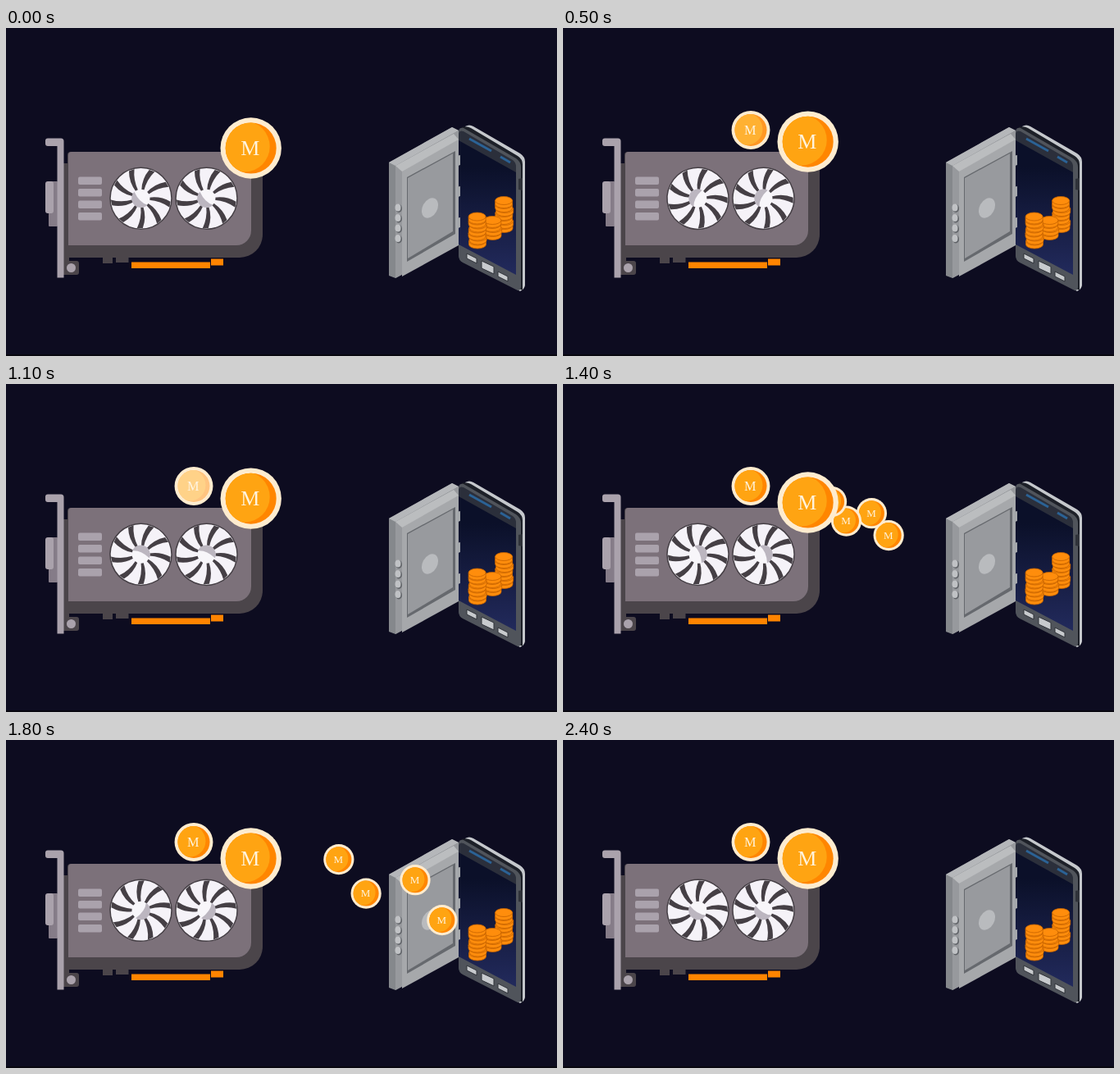
Write an HTML page that moves like this. It is 672x400 px and loops after 2500 ms.

```html
<!DOCTYPE html>
<html lang="en">
<head>
<meta charset="utf-8">
<title>Coin mining</title>
<style>
  html, body { margin: 0; width: 100%; height: 100%; overflow: hidden; background: #0d0c20; }
  svg { display: block; width: 672px; height: 400px; }
  text { font-family: "Liberation Serif", "Noto Serif", serif; }
  .dark { fill: #4b454a; }
  .light { fill: #aaa2ac; }
</style>
</head>
<body>
<svg viewBox="0 0 672 400">
  <defs>
    <clipPath id="disc"><circle r="31"/></clipPath>
    <linearGradient id="screen" x2="0" y2="1">
      <stop offset=".2" stop-color="#0b1029"/>
      <stop offset="1" stop-color="#222a5c"/>
    </linearGradient>
    <g id="coin">
      <circle r="37.2" fill="#feeccf"/>
      <circle r="31" fill="#ff8600"/>
      <g clip-path="url(#disc)"><circle cx="-8" cy="-2" r="31" fill="#ffa412"/></g>
      <text x="-1" y="8" font-size="26" text-anchor="middle" fill="#fff3dc">M</text>
    </g>
    <path id="gap" d="M10-1Q24-3 36 4L35 11Q24 3 10 2Z" fill="#453f45"/>
  </defs>

  <rect width="672" height="400" fill="#0d0c20"/>
  <rect y="398" width="672" height="2" fill="#08070f"/>

  <!-- graphics card -->
  <rect class="dark" x="69" y="165" width="8" height="120"/>
  <rect x="52" y="187" width="11" height="55" rx="1" fill="#857c88"/>
  <rect class="light" x="48" y="187" width="10" height="39" rx="3"/>
  <path class="dark" d="M69 284h17q3 0 3 3v11q0 3-3 3H69z"/>
  <circle class="light" cx="79.5" cy="292.5" r="5.5"/>
  <path class="light" d="M51 134.500H67q3.500 0 3.500 3.500V304.500H62.500V144H51q-3 0-3-3v-3.500q0-3 3-3z"/>
  <path class="dark" d="M75 155q0-4 4-4H309q4 0 4 4V252A28 28 0 0 1 285 280H75z"/>
  <path d="M76 155q0-4 4-4H299V247A18 18 0 0 1 281 265H76z" fill="#7c717a"/>
  <path class="dark" d="M118 279h12v8h-12zM134 279h15.500v7H134z"/>
  <path d="M153 285.500h96v7.500h-96zM250 281.500h15v8h-15z" fill="#ff8400"/>
  <g id="vents"></g>
  <g id="fans"></g>

  <!-- safe door -->
  <path d="M467 164L544 121L552 125V264L475 305L467 302Z" fill="#85888c"/>
  <path d="M467 164L544 121L552 125L475 168Z" fill="#b5b7ba"/>
  <path d="M475 168L552 125V264L475 305Z" fill="#97999d"/>
  <path d="M483 174L552 136V265L483 303Z" fill="#a6a8ab"/>
  <path d="M475 168L546 129L552 136L483 175Z" fill="#bbbdbf"/>
  <path d="M489 182L548 150V251L489 285Z" fill="#66696e"/>
  <path d="M490 183L545 153V248L490 281Z" fill="#989a9e"/>
  <ellipse cx="517" cy="219.500" rx="9" ry="13" fill="#b9bbbe" transform="rotate(28 517 219.500)"/>
  <g id="knobs"></g>

  <!-- phone -->
  <path d="M560 120Q565 117 570 120L627 153Q633 157 633 163V314Q632 319 627 321L560 284Z" fill="#c5c8cc"/>
  <path d="M556 121Q562 119 567 122L624 156Q630 160 630 166V320L556 282Z" fill="#1d2028"/>
  <path d="M552 127Q552 121 558 122L622 159Q628 163 628 170V315Q628 322 622 319L557 286Q552 283 552 278Z" fill="#50545b"/>
  <path d="M552 129Q553 124 558 126L618 161Q622 164 622 169V178L552 139Z" fill="#2b2f3b"/>
  <path d="M552 137L622 176V301L552 264Z" fill="url(#screen)"/>
  <path d="M565 135L592 150M603 157L615 164" stroke="#2b6295" stroke-width="3"/>
  <path d="M625 184l5-1v15l-5-1z" fill="#2f3239"/>
  <g fill="#c7cacd" stroke="#2f3239">
    <path d="M562 275l12 6v6l-12-6z"/>
    <path d="M580 284l15 7v9l-15-7z"/>
    <path d="M600 297l12 6v6l-12-6z"/>
  </g>
  <g id="hinges" fill="#a5a8ac"></g>
  <g id="stacks" fill="#ff8d0c" stroke="#c56300" stroke-width=".8"></g>

  <g id="flying"></g>
  <g id="small">
    <use href="#coin"/>
    <circle id="flash" r="32" fill="#fff7ea"/>
  </g>
  <use id="big" href="#coin"/>
</svg>
<script>
const $ = id => document.getElementById(id);
const repeat = (n, make) => Array.from({ length: n }, (_, i) => make(i)).join("");
const clamp = v => Math.min(1, Math.max(0, v));

$("vents").innerHTML = repeat(4, i =>
  `<rect class="light" x="88" y="${181.5 + i * 14.5}" width="29" height="9.5" rx="2"/>`);
$("knobs").innerHTML = repeat(4, i => {
  const y = 219 + i * 12.5;
  return `<ellipse cx="479" cy="${y + 1}" rx="4" ry="5" fill="#5f6267"/>
    <ellipse cx="478" cy="${y}" rx="3.5" ry="4.5" fill="#c0c2c5"/>`;
});
$("hinges").innerHTML = repeat(3, i => `<path d="M549 ${156 + i * 38}l5-1v12l-5 2z"/>`);

const stack = (x, base, n) => repeat(n, i => {
  const y = base - i * 5, cx = x + Math.sin(i * 2) * .7;
  return `<path d="M${cx - 10.5} ${y}v4a10.5 5 0 0 0 21 0v-4z"/>
    <ellipse cx="${cx}" cy="${y}" rx="10.5" ry="5"/>`;
});
$("stacks").innerHTML = stack(607.5, 240.5, 7) + stack(593.5, 249.5, 4) + stack(575, 260, 7);

const BLADES = 9;
const gaps = repeat(BLADES, i => `<use href="#gap" transform="rotate(${i * 360 / BLADES})"/>`);
$("fans").innerHTML = repeat(2, i =>
  `<g transform="translate(${164.5 + i * 80} 207.8)"><g class="rotor">
    <circle r="37.5" fill="#f5f2f8" stroke="#453f45" stroke-width="1.5"/>${gaps}
    <circle r="11" fill="#f8f6fa"/>
    <path d="M-8-8A11 11 0 0 0 8 8Q-2 5-8-8z" fill="#bcb6c0"/>
  </g></g>`);

const LOOP = 2500, STEP = 100;
const LAUNCH = 1200, FLIGHT = 1000;
const FROM = [298, 145], TO = [574, 210];

// Two bend points for the curve of each flying coin.
const bends = [
  [[480, 225], [580, 232]],
  [[438, 175], [532, 152]],
  [[383, 193], [430, 178]],
  [[350, 148], [375, 112]]
];
$("flying").innerHTML = repeat(bends.length, () => `<use href="#coin"/>`);
const coins = [...$("flying").children];
const rotors = document.querySelectorAll(".rotor");

function bezier([a, b], u) {
  const v = 1 - u;
  return FROM.map((p, k) =>
    v * v * v * p + 3 * u * v * v * a[k] + 3 * u * u * v * b[k] + u * u * u * TO[k]);
}

// Two hops, the second one lower, then rest.
function bigY(t) {
  const rest = 146.5 - 2 * clamp(t / LAUNCH);
  const height = t < 600 ? 14 : t < LAUNCH ? 10 : 0;
  return rest - height * Math.sin(Math.PI * (t % 600) / 600);
}

const flash = t => t < 1300 ? .55 + .4 * Math.cos(2 * Math.PI * (t - 900) / 800) : 0;

const place = (el, x, y, scale = 1) =>
  el.setAttribute("transform", `translate(${x} ${y}) scale(${scale})`);
const fade = (el, opacity) => el.setAttribute("opacity", opacity);

const start = performance.now();

function draw(now) {
  // The motion advances in steps of a tenth of a second.
  const t = Math.floor(Math.max(0, now - start) % LOOP / STEP) * STEP;
  place($("big"), 298.7, bigY(t));
  place($("small"), 229, 124.5, .63);
  fade($("small"), clamp(t / 300));
  fade($("flash"), flash(t));
  rotors.forEach(r => r.setAttribute("transform", `rotate(${t / LOOP * 360})`));

  const u = (t - LAUNCH) / FLIGHT;
  coins.forEach((coin, i) => {
    place(coin, ...bezier(bends[i], clamp(u)), .5);
    fade(coin, u < 0 ? 0 : clamp((1 - u) * 10));
  });
  requestAnimationFrame(draw);
}
draw(start);
</script>
</body>
</html>
```
